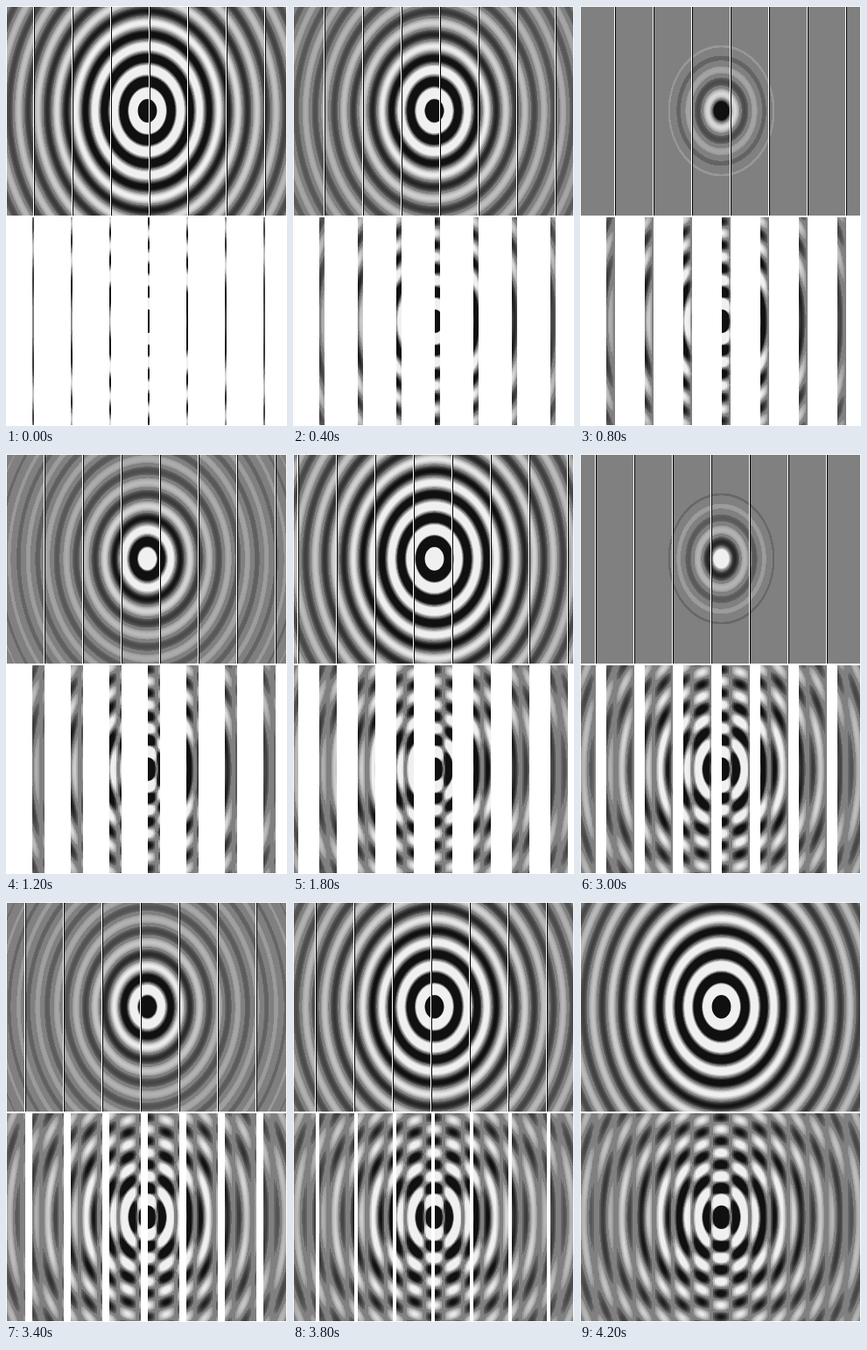
A matplotlib script for the animation above (6.2 s loop, 321 px wide and 479 px high).

```python
import numpy as np
import matplotlib.pyplot as plt
from matplotlib.animation import FuncAnimation

WIDTH, HEIGHT, DPI = 321, 479, 100
STEPS, HOLD = 22, 9            # one wave period, then the result rests
PITCH, SLIT = 44, 2            # distance between slits and slit width
FIRST_SLIT = 30
LEFT, RIGHT = 1, 320
TOP, BOTTOM, TOP_H, BOTTOM_H = 1, 241, 238, 237
CENTRE_X, CENTRE_Y = 161, 119
HALF_WAVE_X, HALF_WAVE_Y = 10.9, 13.4
GAIN = 11.2
FAINTEST, STRONGEST = 0.0875, 0.4375   # weaker tones vanish, stronger ones clip

x = np.arange(LEFT, RIGHT)
y = np.arange(TOP, TOP + TOP_H)[:, None]
ripple = np.sinc(np.hypot((x - CENTRE_X) / HALF_WAVE_X,
                          (y - CENTRE_Y) / HALF_WAVE_Y))
offset = (x - FIRST_SLIT) % PITCH


def wave(step):
    """Grey tones of the standing wave; step may vary per column."""
    height = GAIN * np.cos(2 * np.pi * (step + 1) / STEPS) * ripple
    height = np.where(np.abs(height) < FAINTEST, 0, height)
    return 0.5 - np.clip(height, -STRONGEST, STRONGEST)


scan = wave(offset // SLIT)[:BOTTOM_H]


def compose(step):
    image = np.ones((HEIGHT, WIDTH))
    top = wave(step)
    if step < STEPS - 1:
        edge = SLIT * step + 1
        top[:, offset == edge] = 1
        top[:, offset == edge + 1] = 0
    done = offset < SLIT * (step + 1)
    image[TOP:TOP + TOP_H, LEFT:RIGHT] = top
    image[BOTTOM:BOTTOM + BOTTOM_H, LEFT:RIGHT] = np.where(done, scan, 1)
    return image


fig = plt.figure(figsize=(WIDTH / DPI, HEIGHT / DPI), dpi=DPI, facecolor="white")
ax = fig.add_axes([0, 0, 1, 1])
ax.axis("off")
picture = ax.imshow(compose(0), cmap="gray", vmin=0, vmax=1,
                    interpolation="nearest", aspect="auto")


def update(frame):
    picture.set_data(compose(min(frame, STEPS - 1)))
    return (picture,)


animation = FuncAnimation(fig, update, frames=STEPS + HOLD, interval=200,
                          repeat=True, repeat_delay=0)
plt.show()
```
